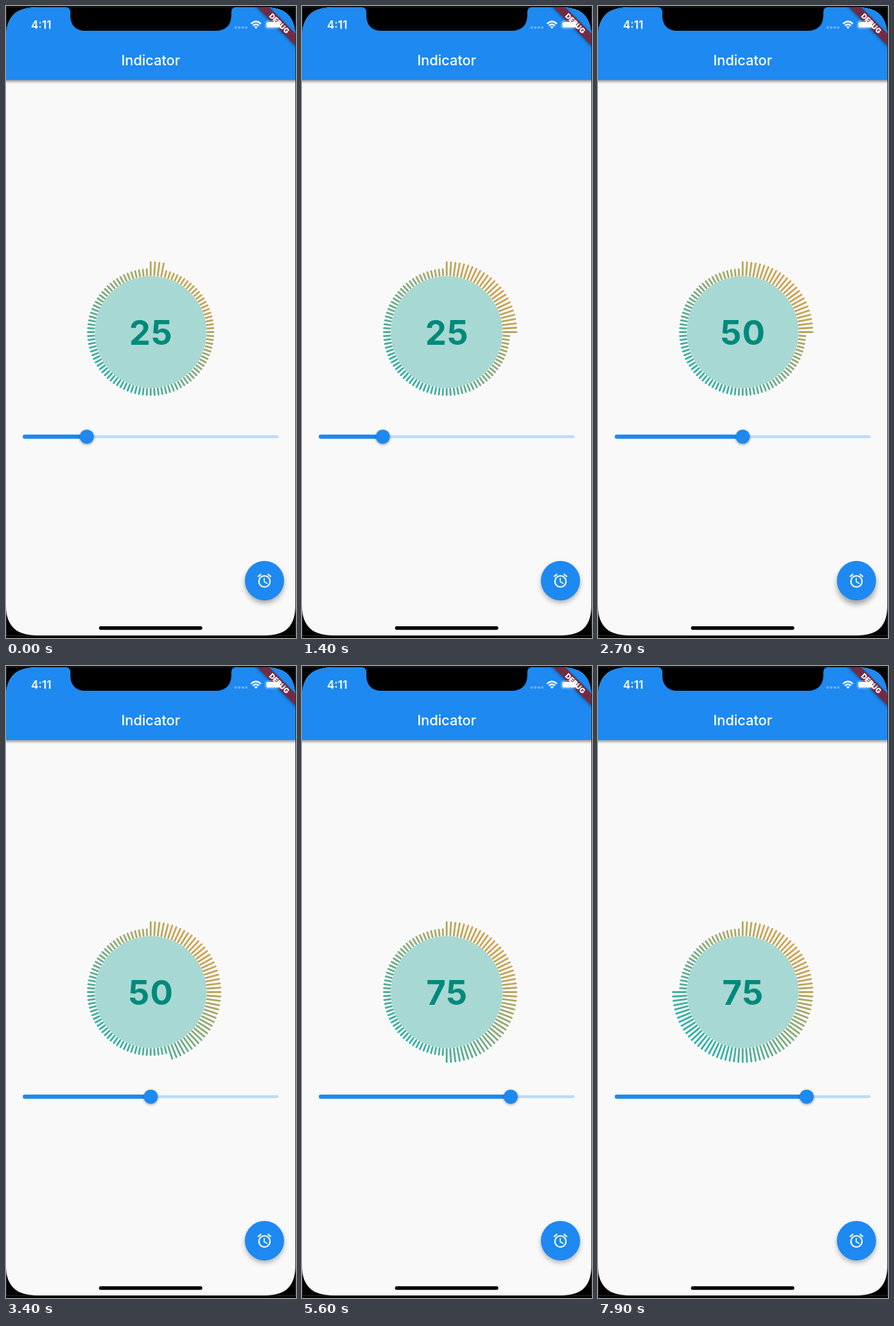
Write an HTML page that moves like this. It is 446 px wide and 970 px high and loops after 8 s.

```html
<!DOCTYPE html>
<html lang="en">
<head>
<meta charset="utf-8">
<title>Indicator</title>
<style>
  html, body { margin: 0; width: 100%; height: 100%; overflow: hidden; background: #000; }
  svg { display: block; width: 446px; height: 970px; }
  text { font-family: Inter, Roboto, sans-serif; }
</style>
</head>
<body>
<svg viewBox="0 0 446 970" xmlns="http://www.w3.org/2000/svg">
  <defs>
    <clipPath id="screen">
      <path d="M0 48C0 16 16 2 48 2H398C430 2 445 16 445 48V920C445 952 430 966 398 966H48C16 966 0 952 0 920Z"/>
    </clipPath>
    <linearGradient id="ring" gradientUnits="userSpaceOnUse" x1="299" y1="424" x2="146" y2="577">
      <stop offset="0" stop-color="#d6a44e"/>
      <stop offset="1" stop-color="#26b2ad"/>
    </linearGradient>
    <filter id="soft" x="-50%" y="-50%" width="200%" height="200%"><feGaussianBlur stdDeviation="2"/></filter>
    <filter id="wide" x="-50%" y="-50%" width="200%" height="200%"><feGaussianBlur stdDeviation="4.5"/></filter>
  </defs>

  <rect width="446" height="970"/>
  <rect x=".5" y="1.5" width="445" height="965" fill="none" stroke="#2b2b2b"/>

  <g clip-path="url(#screen)">
    <rect width="446" height="970" fill="#f9f9f9"/>
    <rect x="-10" y="20" width="466" height="96" fill="#000" opacity=".42" filter="url(#soft)"/>
    <rect width="446" height="113.5" fill="#1d89f1"/>
    <text x="222.5" y="91" font-size="21.5" font-weight="500" fill="#fff" text-anchor="middle">Indicator</text>

    <circle cx="222.5" cy="500.5" r="86" fill="#a8d8d3"/>
    <path id="ticks" fill="none" stroke="url(#ring)" stroke-width="2.8" stroke-linecap="round"/>
    <text id="label" x="223" y="520" font-size="52" font-weight="700" letter-spacing="1" fill="#00897b" text-anchor="middle"></text>

    <path d="M28 661H417" stroke="#bcdbf8" stroke-width="4.4" stroke-linecap="round"/>
    <path id="track" stroke="#1d89f1" stroke-width="6.4" stroke-linecap="round"/>
    <g id="thumb">
      <circle id="halo" r="26" fill="#1d89f1" opacity="0"/>
      <circle cy="1.6" r="10.6" opacity=".4" filter="url(#soft)"/>
      <circle r="10.8" fill="#1d89f1"/>
    </g>

    <g transform="translate(397.5 882)">
      <circle id="shade" r="29" filter="url(#wide)"/>
      <circle r="30.2" fill="#1d89f1"/>
      <g fill="none" stroke="#fff" stroke-width="2.15">
        <circle cy="1.1" r="8.6"/>
        <path d="M-.3 -4.3V1.7L4.4 4.5" stroke-width="1.6"/>
        <path d="M-5.1 -10.1L-10.1 -6M5.1 -10.1L10.1 -6"/>
      </g>
    </g>

    <g transform="translate(446 1) rotate(45)">
      <rect x="-70" y="31" width="140" height="13" opacity=".4" filter="url(#soft)"/>
      <rect x="-70" y="29.8" width="140" height="13" fill="#712c43"/>
      <text y="40.3" font-size="11" font-weight="900" fill="#fff" text-anchor="middle">DEBUG</text>
    </g>

    <text x="38.5" y="35" font-size="17" font-weight="600" fill="#fff">4:11</text>
    <g fill="#fff" opacity=".36">
      <circle cx="353.2" cy="33" r="2"/><circle cx="358.7" cy="33" r="2"/>
      <circle cx="364.1" cy="33" r="2"/><circle cx="369.4" cy="33" r="2"/>
    </g>
    <g fill="none" stroke="#fff" stroke-width="2.4">
      <path d="M376.9 27.4Q384.4 20.2 391.9 27.4M379.7 30.3Q384.4 25.8 389.1 30.3"/>
      <path d="M381.8 32Q384.4 29.8 387 32L384.4 34.9Z" fill="#fff" stroke="none"/>
    </g>
    <rect x="398.5" y="22.5" width="25" height="12.4" rx="3.6" fill="none" stroke="#fff" stroke-opacity=".4"/>
    <rect x="400.3" y="24.2" width="21.4" height="9" rx="2" fill="#fff"/>

    <path d="M92 0V2Q98.5 2 99 9V14C99 30 108 38 123 38H322C337 38 346.5 30 346.5 14V9Q347 2 353 2V0Z"/>
    <rect x="143" y="952" width="159" height="5.4" rx="2.7"/>
  </g>
</svg>
<script>
const LOOP = 8000, CX = 222.5, CY = 500.5, TICKS = 100;
const RATE = 0.03; // gauge ticks per ms
const $ = id => document.getElementById(id);
const clamp = (v, lo = 0, hi = 1) => Math.min(hi, Math.max(lo, v));
const ease = p => p * p * (3 - 2 * p);
const drags = [[1550, 2250], [4800, 5400]];
const sweeps = [-110, 2720, 5750];

const sliderAt = t => drags.reduce((v, [a, b]) => v + 25 * ease(clamp((t - a) / (b - a))), 25);
const gaugeAt = t => Math.floor(sweeps.reduce((v, s) => v + clamp((t - s) * RATE, 0, 25), 0));

// 0..1 between a and b, with short ramps at both ends
const pulse = (t, a, b, ramp) => clamp(Math.min((t - a) / ramp, (b - t) / ramp));

function ringPath(filled) {
  let d = "";
  for (let i = 0; i < TICKS; i++) {
    const a = i / TICKS * 2 * Math.PI, sin = Math.sin(a), cos = Math.cos(a);
    const point = r => (CX + r * sin).toFixed(2) + " " + (CY - r * cos).toFixed(2);
    d += `M${point(87.2)}L${point(i <= filled ? 107.3 : 96.6)}`;
  }
  return d;
}

function draw(t) {
  const value = sliderAt(t), x = 26 + value * 3.933;
  $("ticks").setAttribute("d", ringPath(gaugeAt(t)));
  $("label").textContent = Math.round(value);
  $("track").setAttribute("d", `M29 661H${x}`);
  $("thumb").setAttribute("transform", `translate(${x} 661)`);

  const hold = Math.max(...drags.map(([a, b]) => pulse(t, a - 100, b + 100, 100)));
  $("halo").setAttribute("opacity", 0.12 * hold);
  $("halo").setAttribute("r", 26 * hold);

  const press = Math.max(...sweeps.map(s => pulse(t, s - 120, s + 150, 100)));
  $("shade").setAttribute("cy", 4 + 2 * press);
  $("shade").setAttribute("r", 29 + press);
  $("shade").setAttribute("opacity", 0.36);
}

const start = performance.now();
function tick() {
  draw((performance.now() - start) % LOOP);
  requestAnimationFrame(tick);
}
tick();
</script>
</body>
</html>
```
